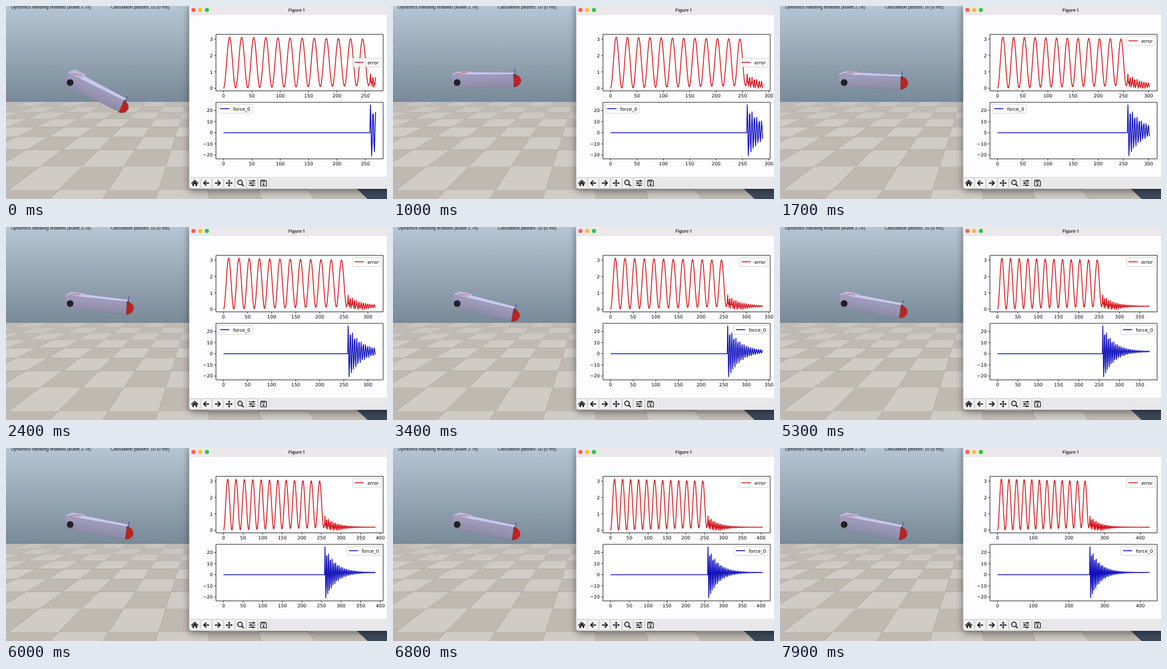
Recreate the animation shown at these times as an HTML page with a canvas. Size 600 by 304 pixels, loop 8 s.

```html
<!DOCTYPE html>
<html lang="en">
<head>
<meta charset="utf-8">
<title>Arm simulation with plots</title>
<style>
html, body { margin: 0; width: 600px; height: 304px; overflow: hidden; }
canvas { display: block; }
</style>
</head>
<body>
<canvas id="stage" width="600" height="304"></canvas>
<script>
const ctx = document.getElementById('stage').getContext('2d');
const STEP = 100, STEPS = 80, START = 268, HIT = 259, PERIOD = 4.52;
const PLOT_FONT = '7.36px "DejaVu Sans", sans-serif';
const X0 = 342.6, SPAN = 239.4;

function poly(points, fill, stroke, width = 0.6) {
  ctx.beginPath();
  points.forEach(([x, y], i) => i ? ctx.lineTo(x, y) : ctx.moveTo(x, y));
  if (fill) { ctx.closePath(); ctx.fillStyle = fill; ctx.fill(); }
  if (stroke) { ctx.strokeStyle = stroke; ctx.lineWidth = width; ctx.stroke(); }
}

function disc(x, y, r, fill) {
  ctx.beginPath();
  ctx.arc(x, y, r, 0, 7);
  ctx.fillStyle = fill;
  ctx.fill();
}

function label(text, x, y, font, color = '#000', align = 'left', base = 'alphabetic') {
  ctx.font = font;
  ctx.fillStyle = color;
  ctx.textAlign = align;
  ctx.textBaseline = base;
  ctx.fillText(text, x, y);
}

// Measured signals
const swing = x => Math.cos(2 * Math.PI * (x - HIT) / PERIOD);
const decay = (x, tau) => Math.exp(-(x - HIT) / tau);

function errorAt(x) {
  if (x < HIT) {
    const low = 0.15 * x / 255, high = 3.13 - 0.12 * x / 255;
    return low + (high - low) * (1 - Math.cos(2 * Math.PI * x / 21.32)) / 2;
  }
  return Math.abs(0.19 + 0.68 * decay(x, 27) * swing(x));
}

function forceAt(x) {
  if (x < HIT) return 0;
  return 2 - 1.5 * decay(x, 20) + 24.5 * decay(x, 27) * swing(x);
}

function armAngle(x) {
  const u = 0.5 * Math.exp(-(x - START) / 30) * swing(x);
  return 0.152 + 0.3 * Math.tanh(u / 0.3);
}

// Scene
function drawScene() {
  const sky = ctx.createLinearGradient(0, 0, 0, 304);
  sky.addColorStop(0, '#b6c5d3');
  sky.addColorStop(0.5, '#788998');
  sky.addColorStop(1, '#3b4658');
  ctx.fillStyle = sky;
  ctx.fillRect(0, 0, 600, 304);

  const vx = 312, vy = 60;
  const rowY = k => vy + 1 / (1 / 91 - 0.00083 * k);
  const colX = (c, y) => vx + (1.055 - 0.342 * c) * (y - vy);
  for (let r = 0; r < 9; r++) {
    const a = rowY(r), b = rowY(r + 1);
    for (let c = 0; c < 18; c++) {
      poly([[colX(c, a), a], [colX(c + 1, a), a], [colX(c + 1, b), b], [colX(c, b), b]],
        (r + c) % 2 ? '#d0cbc5' : '#bfb9b2');
    }
  }
  const haze = ctx.createLinearGradient(0, 151, 0, 190);
  haze.addColorStop(0, 'rgba(192,188,183,.5)');
  haze.addColorStop(1, 'rgba(192,188,183,0)');
  ctx.fillStyle = haze;
  ctx.fillRect(0, 151, 560, 39);

  const font = '7.03px "Liberation Sans", Arial, sans-serif';
  label('Dynamics handling enabled (Bullet 2.78)', 8, 4.2, font, '#14191e');
  label('Calculation passes: 10 (0 ms)', 165, 4.2, font, '#14191e');
}

function drawArm(angle) {
  const cos = Math.cos(angle), sin = Math.sin(angle);
  const at = (x, y, dx = 0, dy = 0) =>
    [101 + x * cos - y * sin + dx, 120.5 + x * sin + y * cos + dy];

  poly([at(88, -9.4), at(12, -11.8), at(12, -11.8, 7, -4), at(88, -9.4, 5, -2.8)], '#c9c7ee');
  poly([at(-10, -12.4), at(-10, -12.4, 12, -5.5), at(10, -11.8, 12, -5.5), at(12, -11.8)], '#bcbadb');
  poly([at(-10, -12.4, 12, -5.5), at(10, -11.8, 12, -5.5)], null, '#8f8fae', 0.5);
  poly([at(-4, -12, 2, -1), at(8, -12, 7, -4)], null, '#d24b55', 0.8);
  poly([at(-1, -12, 7, -4), at(6, -12, 3, -1)], null, '#d98d98', 0.5);

  const [gx, gy] = at(0, -12), [hx, hy] = at(0, 10);
  const shade = ctx.createLinearGradient(gx, gy, hx, hy);
  shade.addColorStop(0, '#a09ebe');
  shade.addColorStop(1, '#8d8aa7');
  poly([at(-10, -12.4), at(88.5, -9.4), at(90, 10), at(-8, 6.5)], shade, '#807e9a', 0.4);
  poly([at(88.5, -9.4), at(88.5, -9.4, 4, -1.5), at(93, 8), at(90, 10)], '#6f6e86');
  disc(101, 120.5, 5.3, '#202124');

  ctx.save();
  ctx.translate(...at(89.3, 0.4));
  ctx.rotate(angle);
  ctx.beginPath();
  ctx.ellipse(0, 0, 11, 9.7, 0, -Math.PI / 2, Math.PI / 2);
  ctx.closePath();
  ctx.fillStyle = '#cb2721';
  ctx.fill();
  ctx.strokeStyle = '#7d1f1e';
  ctx.lineWidth = 0.55;
  ctx.stroke();
  for (const r of [3.5, 7]) {
    ctx.beginPath();
    ctx.ellipse(0, 0, r, 9.7, 0, -Math.PI / 2, Math.PI / 2);
    ctx.stroke();
  }
  for (const y of [-5, 0, 5]) {
    const end = 11 * Math.sqrt(1 - y * y / 94);
    poly([[0, y], [end, y]], null, '#8f2220', 0.4);
  }
  ctx.restore();
  poly([at(91, -9), at(91.5, -18)], null, '#34409c', 1);
}

// Plot window
function drawWindow() {
  ctx.save();
  ctx.shadowColor = 'rgba(0,0,0,.5)';
  ctx.shadowBlur = 12;
  ctx.shadowOffsetY = 3;
  ctx.beginPath();
  ctx.roundRect(288.5, -6, 320, 294, 5);
  ctx.fillStyle = '#fdfcfe';
  ctx.fill();
  ctx.restore();

  ctx.save();
  ctx.clip();
  ctx.fillStyle = '#ebe8ec';
  ctx.fillRect(288, 0, 312, 13);
  ctx.fillStyle = '#d5d2d6';
  ctx.fillRect(288, 13, 312, 0.6);
  ctx.fillStyle = '#e8e7e9';
  ctx.fillRect(288, 269, 312, 19);
  ctx.restore();

  ['#fe5f57', '#febc2e', '#28c840'].forEach((c, i) => disc(295.2 + i * 10.6, 6.3, 3.2, c));
  label('Figure 1', 457.5, 8.6, '700 6.8px Inter, sans-serif', '#38363a', 'center');
  drawToolbar();
}

function drawToolbar() {
  const ink = '#1c1c1e';
  const arrow = () => {
    poly([[-4, 0], [4.5, 0]], null, ink, 1.8);
    poly([[0, -4], [-4, 0], [0, 4]], null, ink, 1.8);
  };
  const icons = [
    () => {
      poly([[-5.5, 0.5], [0, -4.5], [5.5, 0.5]], null, ink, 1.4);
      poly([[-3.8, 0.6], [0, -2.8], [3.8, 0.6], [3.8, 4.5], [1.2, 4.5], [1.2, 1.5],
        [-1.2, 1.5], [-1.2, 4.5], [-3.8, 4.5]], ink);
    },
    arrow,
    () => { ctx.scale(-1, 1); arrow(); },
    () => {
      for (let i = 0; i < 4; i++) {
        poly([[0, 0], [0, -4]], null, ink, 1.3);
        poly([[-2.1, -3], [0, -5.6], [2.1, -3]], ink);
        ctx.rotate(Math.PI / 2);
      }
    },
    () => {
      ctx.beginPath();
      ctx.arc(-1, -1, 3.6, 0, 7);
      ctx.strokeStyle = ink;
      ctx.lineWidth = 1.5;
      ctx.stroke();
      poly([[1.5, 1.5], [5, 5]], null, ink, 2);
    },
    () => [[-3.5, 2], [0, -2], [3.5, 1]].forEach(([y, x]) => {
      poly([[-5.2, y], [5.2, y]], null, ink, 1.1);
      poly([[x, y - 1.6], [x, y + 1.6]], null, ink, 1.9);
    }),
    () => {
      poly([[-4.5, -4.5], [3, -4.5], [4.6, -3], [4.6, 4.6], [-4.5, 4.6], [-4.5, -4.5]], null, ink, 1.2);
      poly([[-2.5, -3.2], [2, -3.2], [2, -1.5], [-2.5, -1.5], [-2.5, -3.2]], null, ink, 0.8);
      disc(0, 1.8, 1.5, ink);
    }
  ];
  icons.forEach((draw, i) => {
    const x = 297.3 + i * 18.05;
    ctx.beginPath();
    ctx.roundRect(x - 8.3, 270.5, 16.6, 16.6, 1.5);
    ctx.fillStyle = '#f3f3f4';
    ctx.fill();
    ctx.strokeStyle = '#c2c2c5';
    ctx.lineWidth = 0.6;
    ctx.stroke();
    ctx.save();
    ctx.translate(x, 278.9);
    draw();
    ctx.restore();
  });
}

function drawLegend(text, color, x, y, w) {
  ctx.beginPath();
  ctx.roundRect(x, y, w, 13.8, 1.5);
  ctx.fillStyle = 'rgba(255,255,255,.8)';
  ctx.fill();
  ctx.strokeStyle = '#c8c8c8';
  ctx.lineWidth = 0.8;
  ctx.stroke();
  poly([[x + 3, y + 6.5], [x + 17.6, y + 6.5]], null, color, 1.35);
  label(text, x + 23.5, y + 9.3, PLOT_FONT);
}

function drawPlot(n, p) {
  const top = p.top, bottom = top + 89;
  const sx = x => X0 + x * SPAN / n, sy = v => p.zero - v * p.scale;

  ctx.fillStyle = '#fff';
  ctx.fillRect(330.7, top, 263.3, 89);
  const tick = 1.1 * n / 9 > 50 ? 100 : 50;
  for (let x = 0; x <= n * 1.05; x += tick) {
    poly([[sx(x), bottom], [sx(x), bottom + 2.6]], null, '#000', 0.8);
    label(x, sx(x), bottom + 10.6, PLOT_FONT, '#000', 'center');
  }
  for (const v of p.ticks) {
    poly([[328.1, sy(v)], [330.7, sy(v)]], null, '#000', 0.8);
    label(String(v).replace('-', '\u2212'), 325.6, sy(v) + 2.7, PLOT_FONT, '#000', 'right');
  }

  ctx.beginPath();
  for (let x = 0; x <= n; x++) ctx.lineTo(sx(x), sy(p.value(x)));
  ctx.strokeStyle = p.color;
  ctx.lineWidth = 1.35;
  ctx.lineJoin = 'round';
  ctx.stroke();

  ctx.strokeStyle = '#000';
  ctx.lineWidth = 0.8;
  ctx.strokeRect(330.7, top, 263.3, 89);
  drawLegend(p.name, p.color, ...p.legend(n));
}

const plots = [
  {
    name: 'error', color: '#d4131a', value: errorAt, top: 44.7, zero: 129.6, scale: 25.8,
    ticks: [0, 1, 2, 3], legend: n => [545.8, n < 292 ? 82.2 : 48.3, 45]
  },
  {
    name: 'force_0', color: '#1010be', value: forceAt, top: 151.8, zero: 199.6, scale: 1.755,
    ticks: [-20, -10, 0, 10, 20], legend: n => [n < 328 ? 334.2 : 537, 155.2, 53.8]
  }
];

function frame(now) {
  const n = START + 2 * (Math.floor(now / STEP) % STEPS);
  drawScene();
  drawArm(armAngle(n));
  drawWindow();
  plots.forEach(p => drawPlot(n, p));
}

let begin;
function loop(now) {
  begin ??= now;
  frame(Math.max(0, now - begin));
  requestAnimationFrame(loop);
}
frame(0);
requestAnimationFrame(loop);
</script>
</body>
</html>
```
